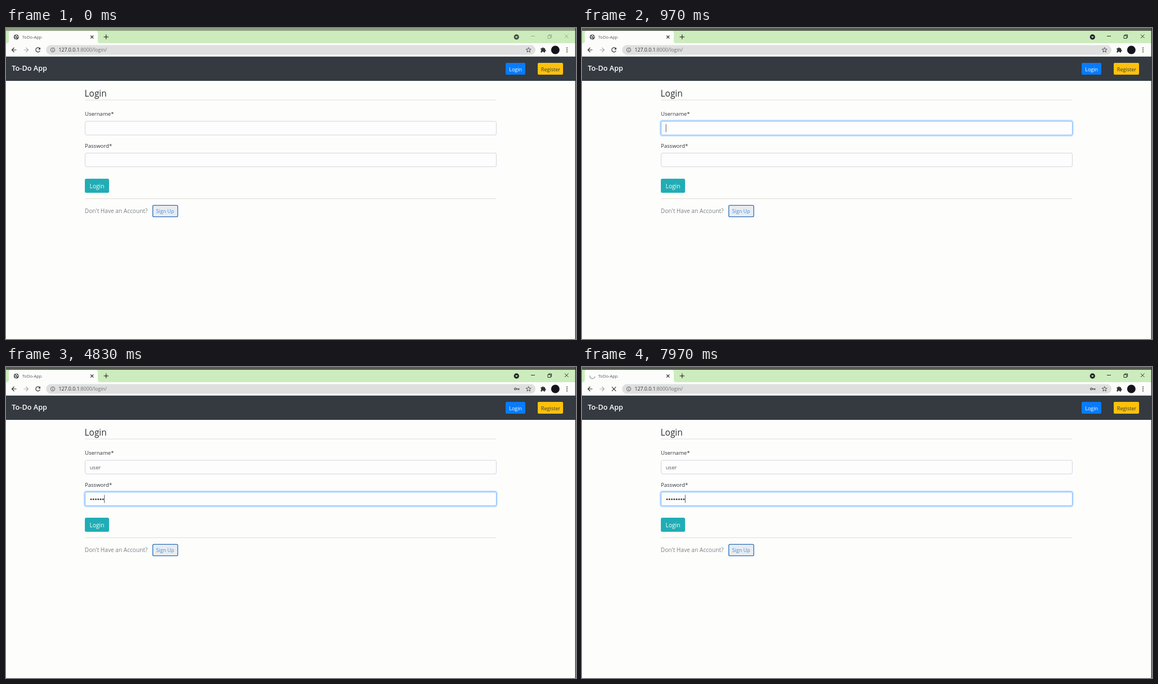
Animation of 1012x553 px, one loop 8 s. Source, as an HTML page:

```html
<!DOCTYPE html>
<html lang="en">
<head>
<meta charset="utf-8">
<title>ToDo-App</title>
<style>
  html, body { margin: 0; width: 100%; height: 100%; overflow: hidden; background: #fdfdfc; }
  svg { display: block; width: 100vw; height: 100vh; font-family: "Open Sans", "Noto Sans", sans-serif; }
  .ink { fill: none; stroke: #333; stroke-width: 1.2; }
  .glow { fill: none; stroke: #bfdeff; stroke-width: 2.4; }
  .field { fill: #fdfdfd; stroke-width: 1; }
</style>
</head>
<body>
<svg viewBox="0 0 1012 553">
  <rect width="1012" height="553" fill="#fdfdfc"/>

  <!-- tab strip -->
  <rect width="1012" height="28" fill="#cdecbd"/>
  <rect id="strip" width="1012" height="5"/>
  <path d="M1 27.500Q5 27 5 23V9Q5 5 9 5H159Q163 5 163 9V23Q163 27 167 27.500Z" fill="#fcfdfb"/>
  <g id="globe">
    <circle cx="18.300" cy="16" r="4.600" fill="#4c5054"/>
    <path d="M14.800 15.500l2.300.6 1 1.600-1.200 1.900M17.500 12.300l1.500 1.300-1.700 1.200M22 14.500l-1.800.8.8 1.800" fill="none" stroke="#f3f3f3" stroke-width="1.200"/>
  </g>
  <path id="spinner" fill="none" stroke="#8d9094" stroke-width="1.100"/>
  <text x="28.700" y="18.600" font-size="7.550" fill="#53575a">ToDo-App</text>
  <path class="ink" d="M150.200 13.500l5 5m0-5l-5 5M173.500 15.800h8.400m-4.200-4.200v8.400"/>
  <g id="controls">
    <circle cx="906.300" cy="16" r="4.700"/>
    <path d="M904 15h4.600l-2.300 2.700Z" fill="#e4f5dc"/>
    <path d="M932 14.500h7M962 13.500h5v5h-5zM963.500 13.500v-1.500h5v5h-1.500M992 11.500l6.500 6.500m0-6.500l-6.500 6.500" fill="none" stroke-width="1"/>
  </g>

  <!-- toolbar -->
  <rect y="27" width="1012" height="24" fill="#fcfdfb"/>
  <path d="M0 50.500H1012" stroke="#d5d7d5"/>
  <path class="ink" d="M18.500 39H10.500m4-4l-4 4 4 4"/>
  <path class="ink" d="M31.500 39H39.500m-4-4l4 4-4 4" style="stroke:#aaa"/>
  <g id="reload">
    <path class="ink" d="M59.600 36.100A3.900 3.900 0 1 0 60.400 40.200"/>
    <path d="M61 34.400V38.300H57.100Z" fill="#333"/>
  </g>
  <path id="stop" class="ink" d="M53 35.400l7.400 7.400m0-7.400l-7.400 7.400"/>
  <rect x="71" y="30.500" width="869" height="17" rx="8.500" fill="#dedfde"/>
  <circle cx="83" cy="39" r="3.700" fill="none" stroke="#555" stroke-width=".9"/>
  <path d="M83 38.500v2.700M83 36.600v1" stroke="#555"/>
  <text x="93.600" y="42.200" font-size="8.720" fill="#707374"><tspan fill="#303335">127.0.0.1</tspan>:8000/login/</text>
  <g id="key" fill="none" stroke="#555">
    <circle cx="904.300" cy="39" r="1.700" stroke-width="1.300"/>
    <path d="M906 39H911.800M909.900 39v2.200" stroke-width="1.400"/>
  </g>
  <path id="star" fill="none" stroke="#444" stroke-width=".9"/>
  <path d="M949.500 36h2.300a1.500 1.500 0 1 1 3 0h2.300v2.400a1.500 1.500 0 1 1 0 3v2.100h-2.500a1.400 1.400 0 0 0-2.800 0h-2.300v-2.600a1.400 1.400 0 0 0 0-2.600Z" fill="#303335"/>
  <circle cx="975.300" cy="39" r="7.500" fill="#15121a"/>
  <g fill="#333"><circle cx="996" cy="35.500" r="1"/><circle cx="996" cy="39" r="1"/><circle cx="996" cy="42.500" r="1"/></g>

  <!-- navigation bar -->
  <rect y="51" width="1012" height="43" fill="#343a40"/>
  <text x="10.300" y="75.800" font-size="12.700" font-weight="600" fill="#fff">To-Do App</text>
  <rect x="887" y="62" width="35" height="21" rx="2" fill="#087bfb"/>
  <text x="893.200" y="76.800" font-size="9.050" fill="#fff">Login</text>
  <rect x="944" y="62" width="45" height="21" rx="2" fill="#fdc10b"/>
  <text x="949.800" y="76.800" font-size="9.050" fill="#343a40">Register</text>

  <!-- form -->
  <text x="139.600" y="122.300" font-size="15.400" fill="#2b3035">Login</text>
  <path d="M140 128H870.500M140 303.500H870.500" stroke="#dddfd9"/>
  <g font-size="9.550" fill="#2f3439">
    <text x="140" y="156.400">Username*</text>
    <text x="140" y="213.200">Password*</text>
  </g>
  <rect id="userGlow" class="glow" x="139" y="164.500" width="732.500" height="27" rx="3.500"/>
  <rect id="userBox" class="field" x="140.500" y="165.900" width="730" height="24.300" rx="2.500"/>
  <text id="userText" x="148.700" y="182.400" font-size="9.600" fill="#555c64"></text>
  <rect id="passGlow" class="glow" x="139" y="221" width="732.500" height="27" rx="3.500"/>
  <rect id="passBox" class="field" x="140.500" y="222.400" width="730" height="24.300" rx="2.500"/>
  <g id="dots" fill="#3f454b"></g>
  <path id="caret" stroke="#444" stroke-width=".9"/>
  <rect x="140" y="268" width="43" height="25" rx="2.500" fill="#21adb4"/>
  <text x="148.600" y="284.700" font-size="10.200" fill="#fff">Login</text>
  <text x="139.800" y="329.300" font-size="10.130" fill="#7b8187">Don't Have an Account?</text>
  <rect x="260.600" y="315.400" width="44.300" height="20.300" rx="2" fill="#e9ecef" stroke="#286fb9" stroke-width="1.300"/>
  <text x="266.500" y="329.200" font-size="9" fill="#3e8ee6">Sign Up</text>
  <path d="M1011.300 0V553" stroke="#35383b" stroke-width="1.400"/>
</svg>

<script>
const LOOP = 8000, BLINK = 530, TURN = 1320;
const FOCUS_USER = 830, ACTIVE = 970, FOCUS_PASS = 2670, SUBMIT = 5700;
const userKeys = [1630, 1770, 2000, 2200];
const passKeys = [3500, 3970, 4230, 4430, 4730, 4830, 5000, 5200];
const DOT_STEP = 4.26;

const $ = id => document.getElementById(id);
const set = (id, name, value) => $(id).setAttribute(name, value);
const show = (id, on) => set(id, "visibility", on ? "visible" : "hidden");
const typed = (keys, t) => keys.filter(k => k <= t).length;
const polar = (cx, cy, r, deg) => {
  const a = deg * Math.PI / 180;
  return (cx + r * Math.cos(a)).toFixed(2) + " " + (cy + r * Math.sin(a)).toFixed(2);
};

set("star", "d", "M" + Array.from({ length: 10 }, (_, i) =>
  polar(927.7, 39.2, i % 2 ? 2 : 4.6, i * 36 - 90)).join("L") + "Z");

const dots = passKeys.map((_, i) => {
  const dot = document.createElementNS("http://www.w3.org/2000/svg", "circle");
  dot.setAttribute("cx", 151 + i * DOT_STEP);
  dot.setAttribute("cy", 235.3);
  dot.setAttribute("r", 1.45);
  return $("dots").appendChild(dot);
});

function focusRing(name, level) {
  set(name + "Glow", "opacity", level);
  set(name + "Box", "stroke", level ? "#80bdff" : "#d2d5df");
}

function drawCaret(t, userCount, passCount) {
  const inPass = t >= FOCUS_PASS;
  // every focus or key press restarts the blink
  let start = Math.max(...[FOCUS_USER, FOCUS_PASS, ...userKeys, ...passKeys].filter(k => k <= t));
  if (t >= 5350) start = 5350;
  show("caret", t >= FOCUS_USER && (t - start) % (2 * BLINK) < BLINK);
  const userWidth = userCount ? $("userText").getComputedTextLength() : 0;
  const x = 149.2 + (inPass ? passCount * DOT_STEP : userWidth);
  set("caret", "d", `M${x} ${inPass ? 227.5 : 171}v14.200`);
}

function drawSpinner(t) {
  const swept = Math.max(0, t - SUBMIT) / TURN * 360;
  const head = -90 - swept, length = Math.min(180, swept);
  set("spinner", "d", length < 1 ? "" :
    `M${polar(18.5, 16, 4.7, head)}A4.7 4.7 0 0 1 ${polar(18.5, 16, 4.7, head + length)}`);
}

function render(t) {
  const active = t >= ACTIVE, loading = t >= SUBMIT;
  const userCount = typed(userKeys, t), passCount = typed(passKeys, t);

  set("strip", "fill", active ? "#555b51" : "#8f9f84");
  set("controls", "fill", active ? "#25282a" : "#4b5449");
  set("controls", "stroke", active ? "#2b2e2c" : "#98a891");
  $("controls").firstElementChild.setAttribute("stroke", "none");
  $("controls").children[1].setAttribute("stroke", "none");

  show("globe", !loading);
  show("reload", !loading);
  show("stop", loading);
  show("key", t >= 3600);
  drawSpinner(t);

  focusRing("user", t < FOCUS_USER || t >= FOCUS_PASS ? 0 : active ? 1 : 0.4);
  focusRing("pass", t < FOCUS_PASS ? 0 : t < 3000 ? 0.85 : 1);
  $("userText").textContent = "user".slice(0, userCount);
  dots.forEach((dot, i) => dot.setAttribute("opacity", i < passCount ? 1 : 0));
  drawCaret(t, userCount, passCount);
}

const origin = performance.now();
function tick() {
  render((performance.now() - origin) % LOOP);
  requestAnimationFrame(tick);
}
tick();
</script>
</body>
</html>
```
